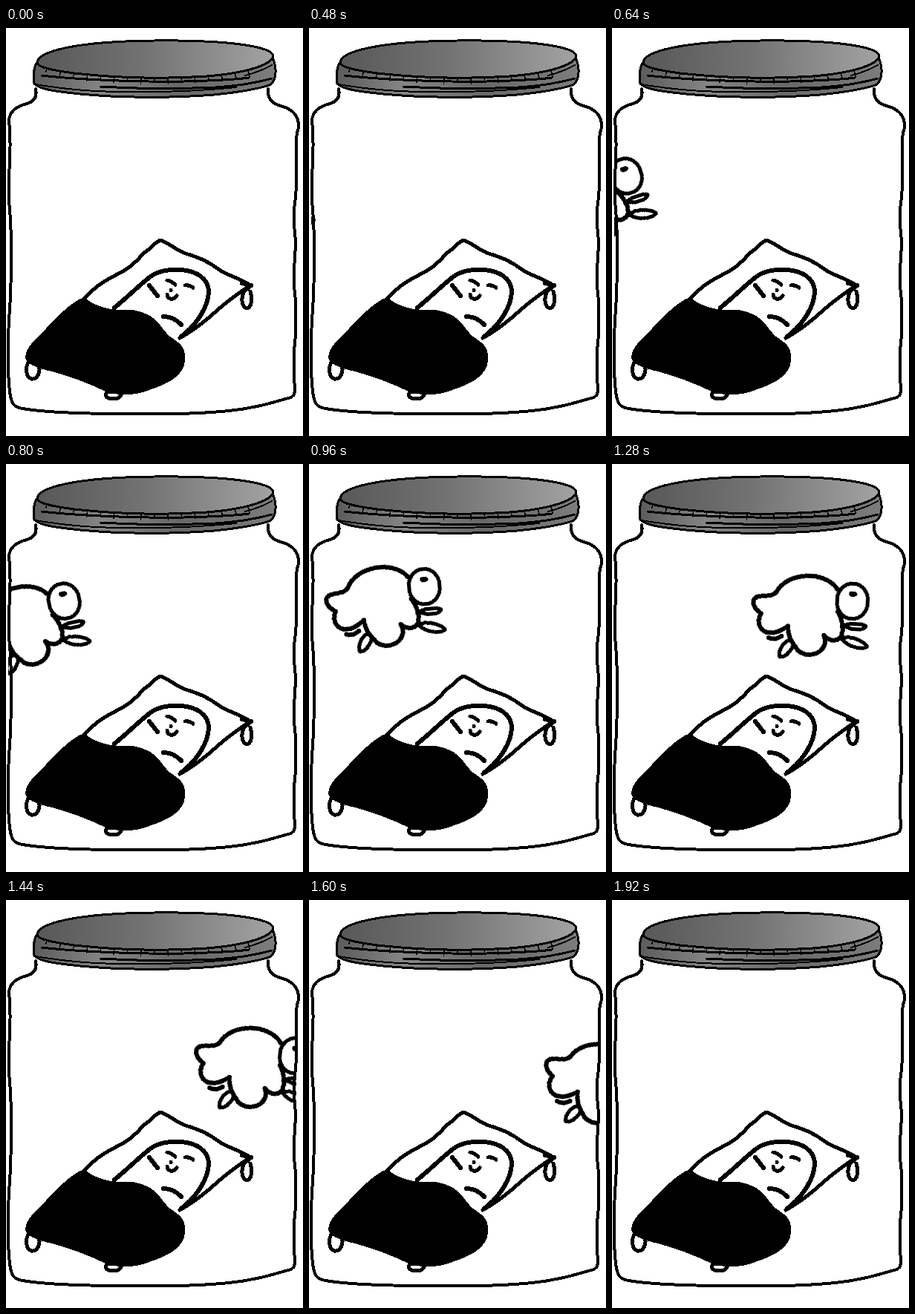
An HTML page for the animation above (2.56 s loop, 400 by 550 pixels).

```html
<!DOCTYPE html>
<html lang="en">
<head>
<meta charset="utf-8">
<title>Sheep in a jar</title>
<style>
html, body { margin: 0; width: 100%; height: 100%; overflow: hidden; background: #fff; }
svg { display: block; width: 400px; height: 550px; }
.ink { fill: none; stroke: #000; stroke-width: 4; stroke-linecap: round; stroke-linejoin: round; }
.bold { stroke-width: 6; }
.white { fill: #fff; }
#sheep { transform-origin: 0 0; transform: translate(-300px, 250px); }
</style>
</head>
<body>
<svg viewBox="0 0 400 550" shape-rendering="crispEdges">
  <defs>
    <linearGradient id="top">
      <stop offset="0" stop-color="#585858"/>
      <stop offset=".45" stop-color="#727272"/>
      <stop offset=".64" stop-color="#838383"/>
      <stop offset="1" stop-color="#a2a2a2"/>
    </linearGradient>
    <linearGradient id="side">
      <stop offset="0" stop-color="#5c5c5c"/>
      <stop offset=".28" stop-color="#858585"/>
      <stop offset=".6" stop-color="#686868"/>
      <stop offset="1" stop-color="#7c7c7c"/>
    </linearGradient>
    <clipPath id="inside"><rect x="3" y="90" width="388" height="430"/></clipPath>
  </defs>

  <!-- bed -->
  <g class="ink bold">
    <path stroke-width="5" d="M106 364C118 350 132 341 148 333C164 326 176 315 186 303C196 297 200 289 208 286C218 289 230 300 242 304C258 309 272 314 286 325C297 334 312 335 329 347C312 358 299 368 286 379C270 394 252 408 234 418"/>
    <path d="M318 344L330 347L320 355"/>
    <path stroke-width="5" d="M320 357C316 366 318 376 324 378C331 377 332 366 329 355"/>
    <path d="M146 377C160 366 176 350 191 338C202 328 216 325 234 326C257 327 272 338 273 354C273 374 259 398 236 416"/>
    <path d="M193 347L204 361"/>
    <path stroke-width="5" d="M217 340Q222 341 228 346M241 347Q247 346 252 350"/>
    <path stroke-width="5" d="M222 353L222 354M217 359C218 367 226 367 230 361"/>
    <path d="M212 389Q226 389 236 400"/>
  </g>
  <g class="ink white" stroke-width="5">
    <path style="stroke-width:5" d="M31 449C25 459 27 470 34 473C43 474 47 463 44 453Z"/>
    <path style="stroke-width:5" d="M136 490C132 497 137 500 144 500C152 500 157 496 155 490Z"/>
  </g>
  <path d="M105 363C118 374 134 379 152 380C172 378 190 383 202 394C211 403 214 413 228 421C240 427 244 440 240 455C234 472 214 481 193 488C176 495 152 497 134 490C112 479 87 470 62 463C48 460 29 455 26 445C26 430 40 420 54 405C70 389 86 370 105 363Z"/>

  <!-- sheep -->
  <g clip-path="url(#inside)">
    <g id="sheep">
      <g class="ink bold white" transform="translate(-185 -165)">
        <path style="stroke-width:5" d="M162 204C151 206 145 218 147 228C156 229 164 216 166 207"/>
        <path d="M131 203Q138 207 148 200"/>
        <path style="stroke-width:5" d="M232 181C242 177 256 177 261 181C258 187 243 187 234 183"/>
        <path style="stroke-width:5" d="M229 199C240 193 259 201 264 208C258 213 239 211 229 199Z"/>
        <path d="M220 133C212 122 196 116 180 117C160 118 144 128 138 141C132 149 122 145 112 149C104 154 108 164 119 171C114 180 116 192 128 196C139 198 148 192 156 186C157 204 166 211 171 218C181 226 197 224 204 214C209 206 207 201 205 196C215 206 227 202 229 194C231 184 229 174 222 163"/>
        <ellipse style="stroke-width:5" cx="241" cy="148" rx="21" ry="24"/>
        <path fill="#000" style="stroke-width:3;fill:#000" d="M237 137Q242 135 246 138Q243 142 238 140Z"/>
      </g>
    </g>
  </g>

  <!-- jar -->
  <g class="ink">
    <path d="M40 82C42 92 39 99 28 102C12 106 5 113 4 124C6 144 6 158 5 178C4 202 3 222 5 246C7 266 7 284 7 310C7 344 6 368 4 394C2 428 2 462 5 490C7 506 10 511 22 513C58 519 110 520 160 520C212 521 262 520 300 516C332 513 356 506 376 500C388 498 389 494 389 486"/>
    <path d="M353 82C352 94 358 102 370 105C388 110 395 120 394 134C389 148 391 164 391 184C392 206 391 224 388 244C386 262 390 276 390 292C389 312 387 330 388 348C391 370 391 390 390 414C387 438 387 462 389 488"/>
  </g>

  <!-- lid -->
  <path class="ink" style="fill:url(#side);stroke-width:3" d="M42 46C36 54 37 66 38 75C45 83 70 86 100 89C150 94 220 95 280 90C310 87 336 83 355 77C363 72 366 58 360 42Z"/>
  <path class="ink" style="fill:url(#top);stroke-width:3" d="M42 47C42 31 96 18 200 17C300 16 360 25 360 38C357 50 322 61 270 65C212 69 146 67 92 61C62 57 43 53 42 47Z"/>
  <g class="ink" style="stroke-width:3">
    <path d="M48 64C100 70 180 73 240 72C280 71 306 70 327 67"/>
    <path d="M127 79C176 82 236 82 282 80C314 78 340 73 358 68"/>
    <path style="stroke-width:2" d="M39 76C72 81 108 86 160 86C220 87 270 84 310 80M322 64Q342 59 358 50"/>
    <path id="ticks" style="stroke-width:1.5"/>
  </g>
</svg>
<script>
const LOOP = 2560, START = 480, STEP = 80;

// Centre x, centre y and tilt in degrees for each step of the jump
const jump = [
  [-83, 251, -24], [-56, 242, -21], [-29, 233, -18], [-1, 223, -15],
  [27, 213, -12], [64, 201, -8], [101, 187, -5], [143, 174, -2],
  [185, 165, 0], [227, 181, 1], [267, 199, 3], [300, 210, 5],
  [332, 221, 6], [364, 232, 8], [394, 243, 10], [422, 255, 12],
  [445, 263, 14], [461, 271, 16]
];
const pose = (x, y, tilt) => `translate(${x}px, ${y}px) rotate(${tilt}deg)`;
const away = pose(-300, 250, 0);
const key = (ms, transform) => ({ offset: ms / LOOP, transform, easing: 'step-end' });

document.getElementById('sheep').animate([
  key(0, away),
  ...jump.map((p, i) => key(START + i * STEP, pose(...p))),
  key(START + jump.length * STEP, away),
  key(LOOP, away)
], { duration: LOOP, iterations: Infinity });

// Short grooves under the lid's edge
let grooves = '';
for (let x = 56; x < 335; x += 18) {
  const u = (x - 200) / 160;
  const y = 43 + 24 * Math.sqrt(1 - u * u);
  grooves += `M${x} ${y}l${u * 3} ${6 + x % 4}`;
}
document.getElementById('ticks').setAttribute('d', grooves);
</script>
</body>
</html>
```
